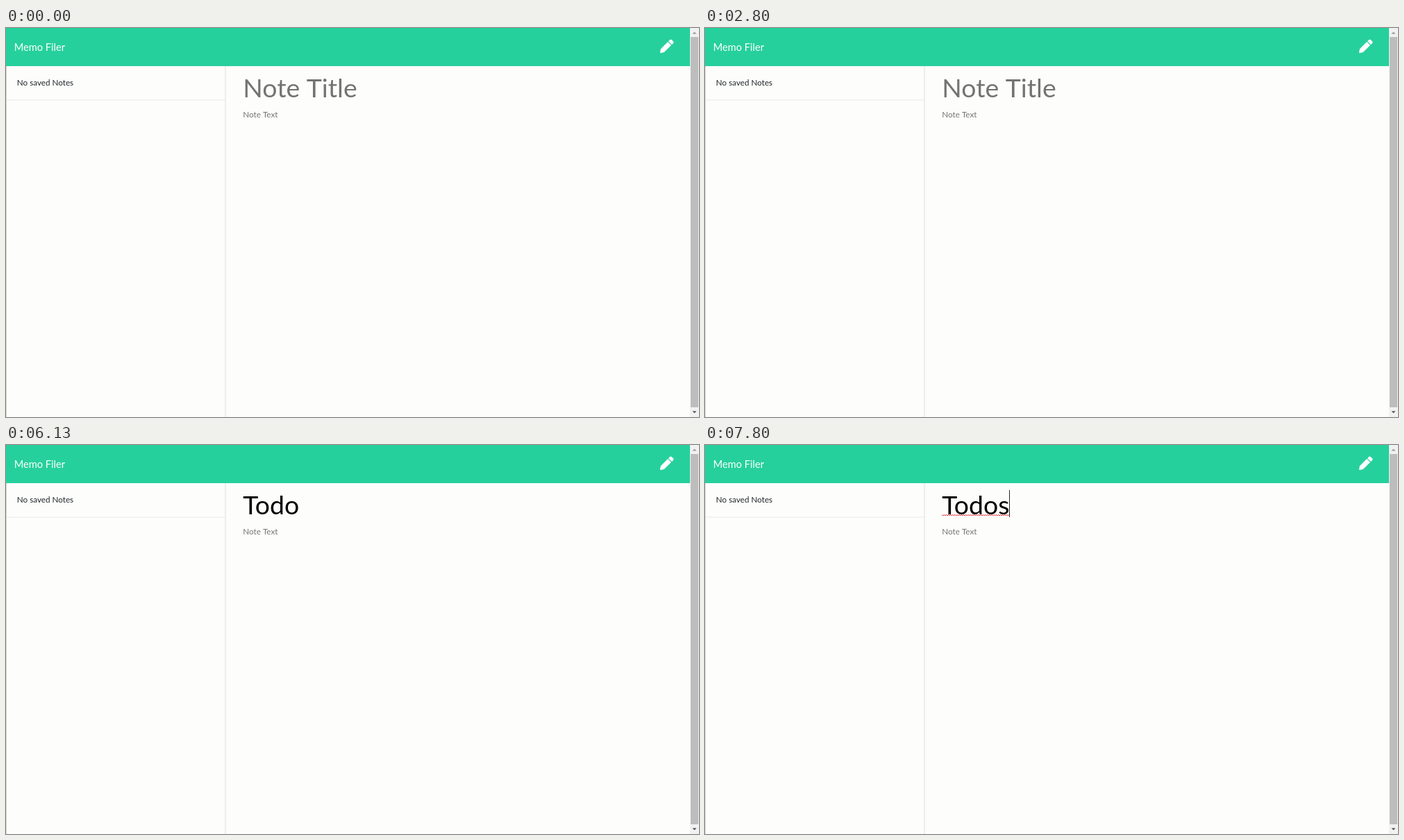
Recreate the animation shown at these times as an HTML page with a canvas. Size 998x561 px, loop 8000 ms.

```html
<!DOCTYPE html>
<html lang="en">
<head>
<meta charset="utf-8">
<title>Notes</title>
<style>
  html, body { margin: 0; width: 100%; height: 100%; overflow: hidden; background: #fdfdfc; }
  canvas { display: block; }
</style>
</head>
<body>
<canvas id="stage" width="998" height="561"></canvas>
<script>
const ctx = document.getElementById('stage').getContext('2d');
const LOOP = 8000;
const FIELD_X = 341.3;
const TITLE_SIZE = 37.4;

// Typed title and the times (ms) at which each letter arrives
const WORD = 'Todos';
const KEYS = [3970, 4190, 4400, 4570, 6570];

// Times at which the caret toggles, starting hidden
const BLINKS = [1870, 2370, 2930, 3500, 3970, 5170, 5670, 6120, 6570, 7070, 7540];
const SPELLCHECK = 7770;

const pencil = new Path2D(
  'M498 142l-46 46c-5 5-12 5-17 0l-111-111c-5-5-5-12 0-17l46-46c19-19 49-19 68 0l60 60c19 19 19 49 0 68z' +
  'M284 100L22 362L0 484c-3 16 11 31 28 28l122-22L412 228c5-5 5-12 0-17L301 100c-5-5-12-5-17 0z');

const passed = (times, t) => times.filter(at => t >= at).length;

function box(x, y, w, h, color) {
  ctx.fillStyle = color;
  ctx.fillRect(x, y, w, h);
}

function text(str, x, y, size, color) {
  ctx.font = size + 'px Lato, sans-serif';
  ctx.fillStyle = color;
  ctx.fillText(str, x, y);
  return ctx.measureText(str).width;
}

function arrow(y, dir, color) {
  ctx.fillStyle = color;
  ctx.beginPath();
  ctx.moveTo(988.5, y);
  ctx.lineTo(994.5, y);
  ctx.lineTo(991.5, y + 3 * dir);
  ctx.fill();
}

function drawHeader() {
  box(0, 0, 985, 55, '#26d09c');
  text('Memo Filer', 11.7, 33, 14.62, '#fff');
  ctx.save();
  ctx.translate(942, 16.5);
  ctx.scale(0.038, 0.038);
  ctx.fillStyle = '#fff';
  ctx.fill(pencil);
  ctx.restore();
}

function drawSidebar() {
  box(0, 55, 1, 506, '#d2d2d2');
  box(1, 103.5, 315, 1, '#e9e9e9');
  box(315.5, 55, 1, 506, '#dedfd6');
  text('No saved Notes', 15.8, 83.3, 11.7, '#212529');
}

function drawScrollbar() {
  box(985, 0, 13, 561, '#f1f1f1');
  box(986, 13, 11, 534, '#bdbdbd');
  arrow(8.5, -1, '#9a9a9a');
  arrow(552.5, 1, '#505050');
}

function drawSquiggle(width) {
  ctx.strokeStyle = '#e02020';
  ctx.lineWidth = 1;
  ctx.beginPath();
  for (let x = 0, i = 0; x <= width; x += 1.56, i++) {
    ctx.lineTo(FIELD_X + x, i % 2 ? 102 : 100.4);
  }
  ctx.stroke();
}

function drawEditor(t) {
  const typed = WORD.slice(0, passed(KEYS, t));
  let width = 0;
  if (typed) width = text(typed, FIELD_X, 99.5, TITLE_SIZE, '#000');
  else text('Note Title', FIELD_X, 99.5, TITLE_SIZE, '#74746f');

  if (t >= SPELLCHECK) drawSquiggle(width);
  if (passed(BLINKS, t) % 2) box(Math.floor(FIELD_X + width), 65, 1, 39, '#222');
  text('Note Text', FIELD_X, 128.5, 11.7, '#74746f');
}

function draw(t) {
  box(0, 0, 998, 561, '#fdfdfc');
  drawHeader();
  drawSidebar();
  drawEditor(t);
  drawScrollbar();
}

const start = performance.now();
function tick() {
  draw((performance.now() - start) % LOOP);
  requestAnimationFrame(tick);
}
tick();
</script>
</body>
</html>
```
